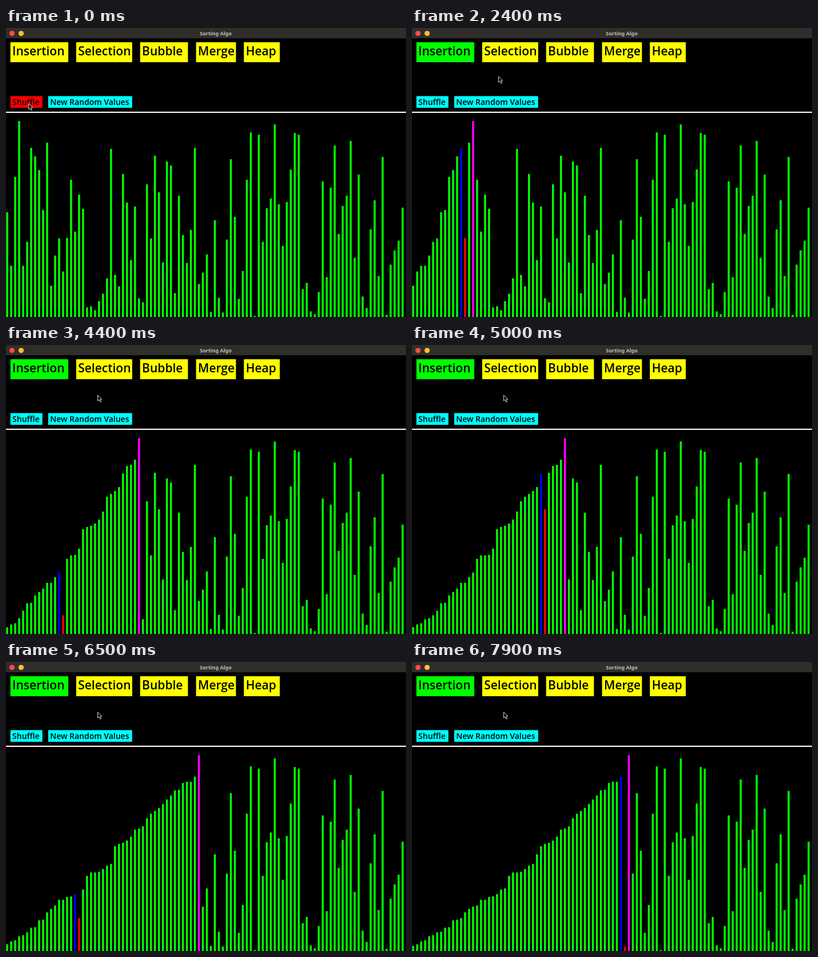
An HTML page with a canvas that plays this animation: 700 px wide and 507 px high, repeating every 8 s.

```html
<!DOCTYPE html>
<html lang="en">
<head>
<meta charset="utf-8">
<title>Sorting Algo</title>
<style>
  html, body { margin: 0; width: 100%; height: 100%; overflow: hidden; background: #000; }
  canvas { display: block; width: 700px; height: 507px; }
</style>
</head>
<body>
<canvas id="stage" width="700" height="507"></canvas>
<script>
const ctx = document.getElementById('stage').getContext('2d');
const W = 700, H = 507, LOOP = 8000, TICK = 100;
const PITCH = 6.99, BAR = 3.5;
const SORT_START = 1864.5, PRESSED = 1800;
const FONT = '"Open Sans", "Noto Sans", sans-serif';
const YELLOW = '#ffff00', GREEN = '#00ff00', CYAN = '#00ffff', RED = '#ff0000';
const BLUE = '#0000ff', MAGENTA = '#ff00ff';

// The unsorted input: top edge of each bar. All later states follow from the sort.
const tops = [
  324, 418, 262, 164, 418, 376, 211, 226, 250, 320, 202, 453, 400, 370, 428, 369, 267, 358, 293, 318,
  491, 489, 496, 480, 467, 440, 213, 434, 454, 257, 307, 408, 314, 475, 482, 275, 370, 225, 289, 412,
  235, 242, 466, 295, 364, 413, 355, 211, 450, 430, 398, 499, 338, 474, 500, 372, 231, 332, 476, 427,
  267, 184, 506, 188, 376, 317, 300, 170, 310, 383, 306, 249, 185, 188, 459, 448, 498, 503, 464, 270,
  438, 281, 207, 362, 313, 295, 199, 404, 258, 472, 492, 354, 303, 436, 227, 504, 416, 391, 374, 316
];

// Key points: [time, value...]
const pace = [[SORT_START, 0], [4400, 362], [5600, 525], [7900, 852]];
const pointer = [[100, 39, 132], [900, 58, 30], [1800, 84, 48], [2400, 151, 84.5], [2700, 160, 87.5]];

function track(keys, t, k = 1) {
  const n = keys.findIndex(key => t <= key[0]);
  if (n === 0) return keys[0][k];
  if (n < 0) return keys[keys.length - 1][k];
  const a = keys[n - 1], b = keys[n];
  return a[k] + (b[k] - a[k]) * (t - a[0]) / (b[0] - a[0]);
}

// Insertion sort after a number of steps: the array, the outer index and the moving key's place.
function sortState(step) {
  for (let i = 1; i < tops.length; i++) {
    const done = tops.slice(0, i).sort((a, b) => b - a);
    const moves = done.filter(v => v < tops[i]).length;
    if (step <= moves) {
      const key = i - step;
      done.splice(key, 0, tops[i]);
      return { list: done.concat(tops.slice(i + 1)), outer: i, key };
    }
    step -= moves + 1;
  }
}

function rect(x, y, w, h, color) {
  ctx.fillStyle = color;
  ctx.fillRect(x, y, w, h);
}

function dot(x, y, color) {
  ctx.fillStyle = color;
  ctx.beginPath();
  ctx.arc(x, y, 4.6, 0, Math.PI * 2);
  ctx.fill();
}

function text(str, x, y, font, color) {
  ctx.font = font;
  ctx.fillStyle = color;
  ctx.fillText(str, x, y);
}

function button(label, x, w, color) {
  rect(x, 25, w, 35, color);
  text(label, x + 3.4, 48.4, `600 21px ${FONT}`, '#000');
}

function smallButton(label, x, w, color) {
  rect(x, 119.5, w, 20.5, color);
  text(label, x + 3.4, 134.8, `600 14px ${FONT}`, '#000');
}

function titleBar() {
  rect(0, 0, W, 18, '#2f2e2a');
  dot(10.5, 9.5, '#ff4a4a');
  dot(26.5, 9.5, '#ffc02c');
  ctx.textAlign = 'center';
  text('Sorting Algo', 367, 13, '600 9px "Noto Sans", sans-serif', '#c4c3bd');
  ctx.textAlign = 'left';
}

function bars(t) {
  const state = t < SORT_START
    ? { list: tops }
    : sortState(Math.round(track(pace, t)));
  state.list.forEach((top, n) => {
    let color = GREEN;
    if (n === state.outer) color = MAGENTA;
    if (n === state.key - 1) color = BLUE;
    if (n === state.key) color = RED;
    rect(0.3 + n * PITCH, top - 0.8, BAR, H, color);
  });
}

function arrow(x, y) {
  const pts = [[0, 0], [0, 10], [2.4, 8], [4.2, 12], [6, 11.2], [4.3, 7.4], [7.3, 7.2]];
  ctx.beginPath();
  pts.forEach(([dx, dy]) => ctx.lineTo(x + 0.5 + dx, y + 0.5 + dy));
  ctx.closePath();
  ctx.fillStyle = '#000';
  ctx.fill();
  ctx.strokeStyle = '#f4f2e6';
  ctx.lineWidth = 0.9;
  ctx.stroke();
}

function draw(t) {
  rect(0, 0, W, H, '#000');
  titleBar();
  button('Insertion', 7.7, 101.3, t < PRESSED ? YELLOW : GREEN);
  button('Selection', 122.8, 98, YELLOW);
  button('Bubble', 234.7, 83.7, YELLOW);
  button('Merge', 332.6, 69.8, YELLOW);
  button('Heap', 416.3, 62.8, YELLOW);
  smallButton('Shuffle', 7.7, 56, t < TICK ? RED : CYAN);
  smallButton('New Random Values', 73.8, 146.9, CYAN);
  rect(0, 146.8, W, 2.1, '#fff');
  bars(t);
  arrow(track(pointer, t), track(pointer, t, 2));
}

const start = performance.now();
function frame() {
  const t = (performance.now() - start) % LOOP;
  draw(Math.floor(t / TICK) * TICK);
  requestAnimationFrame(frame);
}
frame();
</script>
</body>
</html>
```
